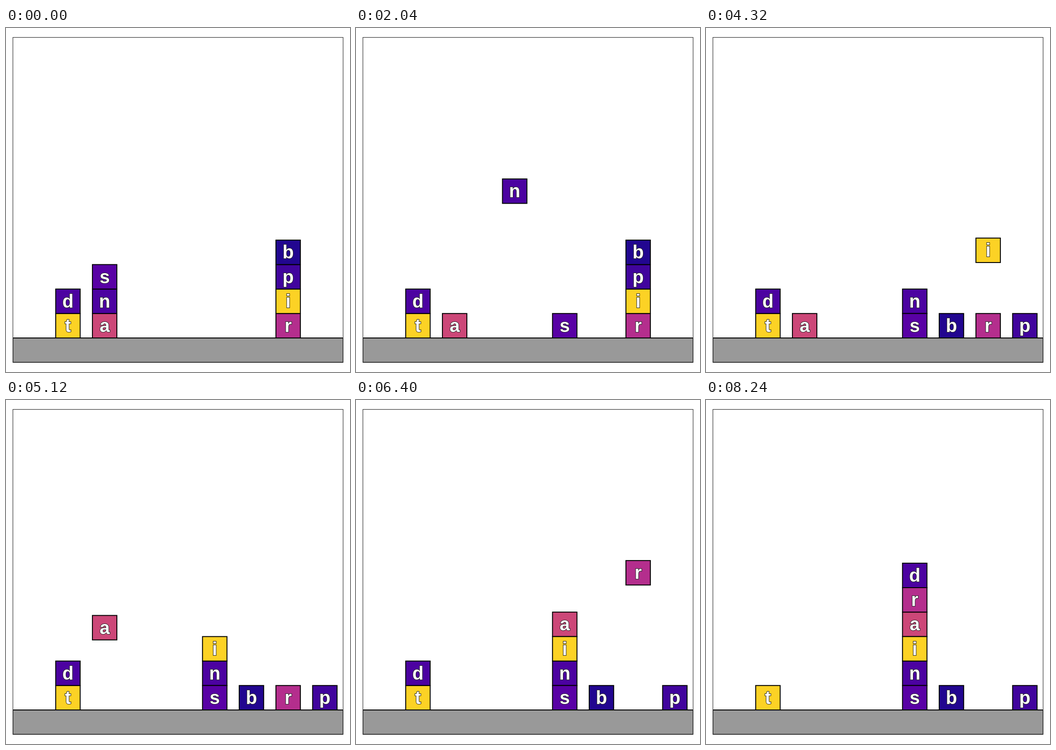
Animation of 748x748 px, one loop 8280 ms. Source, as an HTML page with a canvas:

```html
<!DOCTYPE html>
<html>
<head>
<meta charset="utf-8">
<title>Stacking blocks</title>
<style>
  html, body { margin: 0; width: 100%; height: 100%; overflow: hidden; background: #fff; }
  canvas { display: block; }
</style>
</head>
<body>
<canvas id="stage" width="748" height="748"></canvas>
<script>
const ctx = document.getElementById('stage').getContext('2d');
const UNIT = 53.2, LEFT = 15, TOP = 20.5, WIDTH = 718, FLOOR = 674, BOTTOM = 727.2;
const STEP_MS = 40, SPEED = 0.4, CLEARANCE = 1.5, COLUMN_GAP = 1.5;
const COLORS = {
  a: '#cc4778', b: '#220690', d: '#4c02a1', i: '#fcd225', n: '#4c02a1',
  p: '#41049d', r: '#b42e8d', s: '#5901a5', t: '#fcd225'
};
const START = ['td', 'ans', '', '', '', '', 'ripb', ''];
const MOVES = ['s4', 'n4', 'b5', 'p7', 'i4', 'a4', 'r4', 'd4'];

// Positions are in block units: x from the first column, y above the floor.
function startPose() {
  const pose = {};
  START.forEach((stack, col) =>
    [...stack].forEach((name, row) => pose[name] = { x: col * COLUMN_GAP, y: row }));
  return pose;
}

// Each move lifts a block above the tallest stack, carries it across and lowers it.
function planLegs() {
  const stacks = START.map(s => [...s]);
  const legs = [];
  let begin = 0;
  for (const [name, target] of MOVES) {
    const col = stacks.findIndex(s => s.includes(name));
    stacks[col].pop();
    const peak = Math.max(...stacks.map(s => s.length)) + CLEARANCE;
    const x0 = col * COLUMN_GAP, x1 = target * COLUMN_GAP;
    const path = [[x0, stacks[col].length], [x0, peak], [x1, peak], [x1, stacks[target].length]];
    for (let k = 0; k < 3; k++) {
      const from = path[k], to = path[k + 1];
      const length = Math.abs(to[0] - from[0]) + Math.abs(to[1] - from[1]);
      const steps = Math.round(length / SPEED);
      legs.push({ name, from, to, begin, steps });
      begin += steps;
    }
    stacks[target].push(name);
  }
  return { legs, total: begin + 1 };
}

const { legs, total } = planLegs();

function poseAt(step) {
  const pose = startPose();
  for (const { name, from, to, begin, steps } of legs) {
    if (step <= begin) break;
    const f = Math.min(1, (step - begin) / steps);
    pose[name] = { x: from[0] + (to[0] - from[0]) * f, y: from[1] + (to[1] - from[1]) * f };
  }
  return pose;
}

function box(x, y, w, h, fill) {
  ctx.fillStyle = fill;
  ctx.fillRect(x, y, w, h);
  ctx.strokeRect(x, y, w, h);
}

function drawBlock(name, { x, y }) {
  const px = LEFT + (1.75 + x) * UNIT, py = FLOOR - (y + 1) * UNIT;
  ctx.strokeStyle = '#000';
  ctx.lineWidth = 2;
  box(px, py, UNIT, UNIT, COLORS[name]);
  const cx = px + UNIT / 2, base = py + UNIT / 2 + 13.5;
  ctx.strokeStyle = '#222';
  ctx.strokeText(name, cx, base);
  ctx.fillStyle = '#fff';
  ctx.fillText(name, cx, base);
}

function draw(step) {
  ctx.fillStyle = '#fff';
  ctx.fillRect(0, 0, 748, 748);
  ctx.strokeStyle = '#000';
  ctx.lineWidth = 2;
  ctx.save();
  ctx.beginPath();
  ctx.rect(LEFT, TOP, WIDTH, BOTTOM - TOP);
  ctx.clip();
  box(LEFT, FLOOR, WIDTH, BOTTOM - FLOOR, '#999');
  ctx.restore();

  ctx.font = 'bold 40px "Liberation Sans", Arial, sans-serif';
  ctx.textAlign = 'center';
  ctx.lineJoin = 'miter';
  ctx.miterLimit = 3;
  for (const [name, at] of Object.entries(poseAt(step))) drawBlock(name, at);

  ctx.strokeStyle = '#333';
  ctx.lineWidth = 1.2;
  ctx.strokeRect(LEFT, TOP, WIDTH, BOTTOM - TOP);
}

const origin = performance.now();
function tick() {
  draw(Math.floor((performance.now() - origin) / STEP_MS) % total);
  requestAnimationFrame(tick);
}
tick();
</script>
</body>
</html>
```
